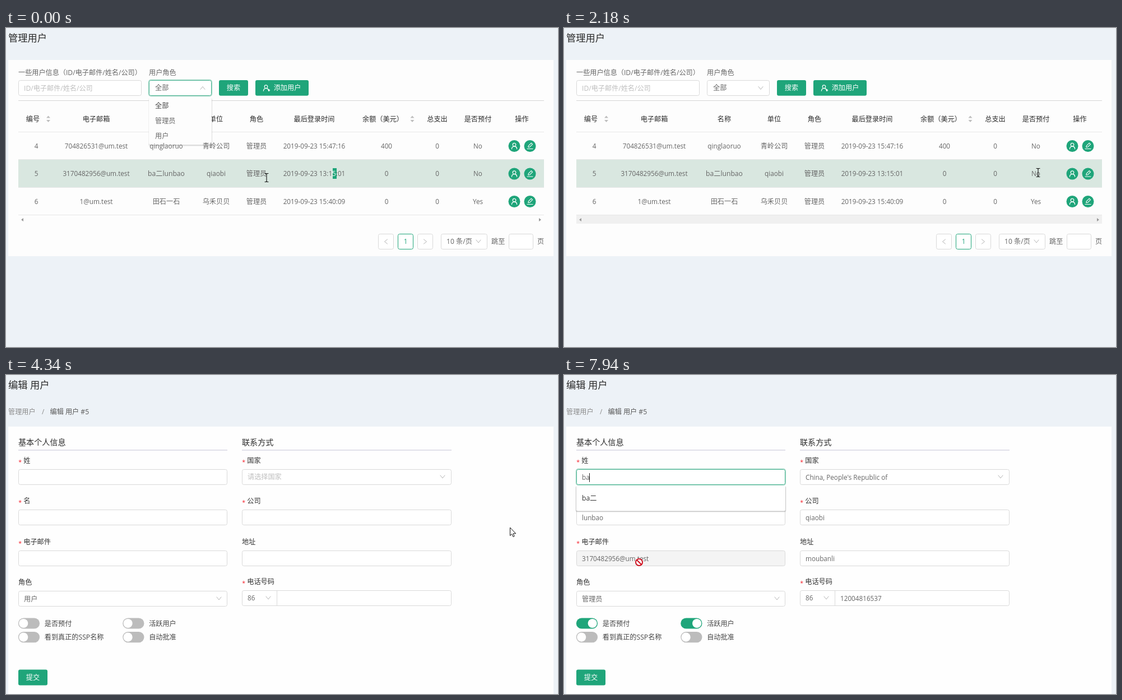
An HTML page that plays this animation: 985x569 px, repeating every 8000 ms.

```html
<!DOCTYPE html>
<html lang="zh-CN">
<head>
<meta charset="utf-8">
<title>管理用户</title>
<style>
html, body { margin: 0; width: 100%; height: 100%; overflow: hidden; background: #edf2f7; }
svg { display: block; font-family: "Open Sans", "Noto Sans CJK SC", "Noto Sans CJK", sans-serif; }
text { white-space: pre; }
</style>
</head>
<body>
<svg id="stage" width="985" height="569" viewBox="0 0 985 569"></svg>
<script>
const stage = document.getElementById('stage');
const LOOP = 8000, GREEN = '#1fa57a', DARK = '#2b2b2b', GREY = '#666', LINE = '#d9d9d9';

const person = { name: 'ba二', given: 'lunbao', email: '3170482956@um.test', firm: 'qiaobi' };
const columns = [54, 161, 286, 375, 447, 550, 679, 769.5, 842];
const rows = [
  [4, '704826531@um.test', 'qinglaoruo', '青岭公司', '管理员', '2019-09-23 15:47:16', 400, 0, 'No'],
  [5, person.email, person.name + person.given, person.firm, '管理员', '2019-09-23 13:15:01', 0, 0, 'No'],
  [6, '1@um.test', '田石一石', '乌禾贝贝', '管理员', '2019-09-23 15:40:09', 0, 0, 'Yes']
];

// time, x, y, pointer shape
const pointerKeys = [
  [0, 465, 267, 'beam'], [140, 560, 312, 'arrow'], [420, 762, 291, 'arrow'], [700, 812, 369, 'arrow'],
  [1130, 877, 260, 'arrow'], [1260, 872, 258, 'arrow'], [1880, 846, 258, 'beam'], [2310, 846, 258, 'beam'],
  [2970, 860, 264, 'arrow'], [3240, 860, 264, 'arrow'], [3250, 900, 297, 'arrow'], [3520, 942, 264, 'hand'],
  [3790, 936, 261, 'hand'], [4220, 936, 261, 'arrow'], [4340, 899, 272, 'arrow'], [4480, 899, 272, 'arrow'],
  [5150, 560, 500, 'arrow'], [5280, 460, 524, 'arrow'], [5690, 47, 442, 'hand'], [5960, 47, 442, 'hand'],
  [6140, 62, 158, 'arrow'], [6270, 123, 205, 'arrow'], [6410, 123, 200, 'beam'], [6690, 123, 185, 'beam'],
  [7930, 123, 185, 'beam'], [7940, 134, 334, 'denied']
];

const isWide = s => /[\u3000-\uffef]/.test(s);

function text(s, x, cy, { fill = GREY, size, anchor = 'start', weight = 400 } = {}) {
  s = String(s);
  size = size || (isWide(s) ? 12.15 : 11.72);
  return `<text x="${x}" y="${cy + size * 0.37}" font-size="${size}" fill="${fill}" text-anchor="${anchor}" font-weight="${weight}">${s}</text>`;
}
const mid = (s, x, cy, fill) => text(s, x, cy, { fill, anchor: 'middle' });
const rect = (x, y, w, h, fill, extra = '') => `<rect x="${x}" y="${y}" width="${w}" height="${h}" fill="${fill}" ${extra}/>`;
const path = (d, stroke, fill = 'none', width = 1) => `<path d="${d}" stroke="${stroke}" fill="${fill}" stroke-width="${width}" stroke-linejoin="round" stroke-linecap="round"/>`;
const at = (x, y, body) => `<g transform="translate(${x} ${y})">${body}</g>`;
const rule = (x, y, w, color) => rect(x, y, w, 1, color);

function box(x, y, w, h = 28, { fill = '#fff', stroke = LINE, focus = false } = {}) {
  const glow = focus ? rect(x - .5, y - .5, w + 1, h + 1, 'none', 'rx="4" stroke="#a9dac9" stroke-width="1.4"') : '';
  return glow + rect(x + .5, y + .5, w - 1, h - 1, fill, `rx="3" stroke="${focus ? '#4cb494' : stroke}"`);
}
const chevron = (x, y, dir = 1) => path(`M${x - 4} ${y - 2.5 * dir}l4 ${5 * dir}l4 ${-5 * dir}`, '#b5b5b5');
const button = (x, y, w, label, cx = x + w / 2) =>
  rect(x, y, w, 27.8, GREEN, 'rx="3"') + text(label, cx, y + 14, { fill: '#fff', anchor: 'middle', weight: 500 });
const userIcon = (x, y) => at(x, y, '<circle cy="-2.3" r="2.8" fill="none" stroke="#fff" stroke-width="1.2"/>' +
  path('M-4.6 5.2c0-6 9.2-6 9.2 0', '#fff', 'none', 1.2));
const pencilIcon = (x, y) => at(x, y, path('M-3.2 2.2l.5-2.6l5-5l2.2 2.2l-5 5zM-5 5h10', '#fff', 'none', 1.1));
const disc = (x, y) => `<circle cx="${x}" cy="${y}" r="10.5" fill="${GREEN}"/>`;
const sorter = x => path(`M${x - 3.5} 160.5l3.5-4l3.5 4zM${x - 3.5} 164l3.5 4l3.5-4z`, 'none', '#bdbdbd');

function pointer(t) {
  let i = pointerKeys.length - 1;
  while (pointerKeys[i][0] > t) i--;
  const [t0, x0, y0, shape] = pointerKeys[i];
  const [t1, x1, y1] = pointerKeys[i + 1] || [LOOP, x0, y0];
  // the pointer moves in visible jumps about 135 ms apart
  const steps = Math.max(1, Math.round((t1 - t0) / 135));
  const k = Math.floor((t - t0) / (t1 - t0) * steps) / steps;
  return { x: Math.round(x0 + (x1 - x0) * k), y: Math.round(y0 + (y1 - y0) * k), shape };
}

const shapes = {
  arrow: path('M.5 .5V14.5L3.7 11.6L6 16.6L8.2 15.6L6 10.8H10.3Z', '#111', '#fff'),
  beam: path('M-3 -7.5H-1L0 -6.5L1 -7.5H3M0 -6.5V6.5M-3 7.5H-1L0 6.5L1 7.5H3', '#111', 'none', 1.1),
  hand: path('M0 1.5C0-.6 2.6-.6 2.6 1.5V7L5.2 7.3L8 8L10 9.2V14L8.6 19.5H1.6L-3.2 12.6C-4 10.4-1.6 9.2 0 11Z', '#111', '#fff'),
  denied: '<circle r="6" fill="#fff" stroke="#cf1322" stroke-width="2"/>' + path('M-4 -4L4 4', '#cf1322', 'none', 2)
};

function listPage(t, cursor) {
  const open = t < 140;
  const hovered = Math.floor((cursor.y - 185.5) / 49.5);
  let s = text('管理用户', 4, 18, { fill: DARK, size: 17.3 }) + rect(4, 57, 973, 350, '#fdfdfd');
  s += text('一些用户信息（ID/电子邮件/姓名/公司）', 22, 80) + text('用户角色', 255, 80);
  s += box(22, 93, 220) + text('ID/电子邮件/姓名/公司', 32, 107.5, { fill: '#bfbfbf' });
  s += box(255, 93, 112, 28, { focus: open }) + text('全部', 266, 107) + chevron(351, 107, open ? -1 : 1);
  s += button(380, 93, 52, '搜索') + button(445, 93, 95, '添加用户', 502);
  s += userIcon(464, 107) + path('M468 111h3M469.5 109.5v3', '#fff');
  s += rule(22, 129, 938, '#d6d6d6');

  const heads = { 编号: 48, 电子邮箱: 161, 名称: 286, 单位: 375, 角色: 447, 最后登录时间: 550,
    '余额（美元）': 672.5, 总支出: 769.5, 是否预付: 842, 操作: 920.5 };
  for (const label in heads) s += mid(label, heads[label], 162.5, DARK);
  s += sorter(75.5) + sorter(725) + rule(22, 185, 938, '#e8e8e8');

  let cells = '';
  rows.forEach((row, r) => {
    const top = 185.5 + r * 49.5, cy = 210.5 + r * 49.5;
    if (r === hovered) s += rect(22, Math.round(top), 938, 49, '#d9e7e0');
    s += rule(22, Math.round(top + 48.5), 938, '#e8e8e8');
    row.forEach((value, c) => {
      let fill = GREY;
      if (r === 1 && c === 5 && open) {
        cells += rect(583, 250, 7, 19, GREEN);
        value = value.replace('15:', '1<tspan fill="#fff">5</tspan>:');
      }
      if (r === 1 && c === 8 && t >= 2310) {
        cells += rect(833.5, 250, 17, 19, GREEN);
        fill = '#fff';
      }
      cells += mid(value, columns[c], cy, fill);
    });
    cells += disc(907, cy) + userIcon(907, cy) + disc(935, cy) + pencilIcon(935, cy);
  });

  if (open) {
    s += rect(255, 125, 113, 85, '#000', 'opacity=".08" rx="3"') + rect(254, 125, 114, 86, '#000', 'opacity=".05" rx="3"');
    s += rect(255, 124, 112, 84, '#fdfdfd', 'rx="3"');
    s += text('全部', 266, 138.5, { fill: '#444', weight: 500 }) + text('管理员', 266, 166) + text('用户', 266, 193);
  }
  s += cells;

  if (!open) s += rect(22, 334, 938, 15, '#f0f0f0');
  s += path('M31 339v6l-4-3zM951 339v6l4-3z', 'none', '#999');
  s += box(664, 367, 28) + path('M680.5 377l-5 4l5 4', '#b5b5b5');
  s += box(699, 367, 28, 28, { stroke: GREEN }) + mid(1, 713, 381, GREEN);
  s += box(734, 367, 28) + path('M745.5 377l5 4l-5 4', '#b5b5b5');
  s += box(776, 367, 83) + text('10 条/页', 786, 381) + chevron(843, 380.5);
  return s + text('跳至', 866, 381) + box(897, 367, 44) + text('页', 948, 381);
}

const LEFT = { x: 22, w: 373 }, RIGHT = { x: 421, w: 374 };

function field({ x, w }, y, label, value, { required = true, select = false, disabled = false, hint = '', focus = false } = {}) {
  let s = required ? text('*', x + .3, y - 13, { fill: '#f5222d', size: 10.5 }) : '';
  s += text(label, x + (required ? 9.3 : 0), y - 15, { fill: '#333' });
  s += box(x, y, w, 28, { fill: disabled ? '#f4f4f4' : '#fff', focus });
  s += value ? text(value, x + 10, y + 14.5) : text(hint, x + 10, y + 14, { fill: '#bfbfbf' });
  return s + (select ? chevron(x + 358, y + 13.5) : '');
}

const toggle = (x, y, on, label) => rect(x, y, 38.3, 19.2, on ? GREEN : '#bcbcbc', 'rx="9.6"') +
  `<circle cx="${x + (on ? 28.9 : 9.4)}" cy="${y + 9.6}" r="8.1" fill="#fff"/>` + text(label, x + 47, y + 9.7, { fill: '#444' });

function editPage(t) {
  const loaded = t >= 5280, focus = t >= 6410, typed = t >= 7670;
  const value = v => loaded ? v : '';
  let s = text('编辑 用户', 4, 18, { fill: DARK, size: 17.3 });
  s += text('管理用户', 4, 66, { fill: '#8a8a8a' }) + text('/', 64, 66, { fill: '#8a8a8a' }) + text('编辑 用户 #5', 78.5, 66, { fill: '#555' });
  s += rect(4, 92, 973, 477, '#fefefe');
  [['基本个人信息', LEFT], ['联系方式', RIGHT]].forEach(([label, { x, w }]) => {
    s += text(label, x, 119.5, { fill: DARK, size: 14.1 }) + rule(x, 133.5, w, '#c6c4d6');
  });

  s += field(LEFT, 168, '姓', value(typed ? person.name.slice(0, 2) : person.name), { focus });
  s += field(LEFT, 240, '名', value(person.given));
  s += field(LEFT, 313, '电子邮件', value(person.email), { disabled: loaded });
  s += field(LEFT, 385, '角色', loaded ? '管理员' : '用户', { required: false, select: true });
  s += field(RIGHT, 168, '国家', value("China, People's Republic of"), { select: true, hint: '请选择国家' });
  s += field(RIGHT, 240, '公司', value(person.firm));
  s += field(RIGHT, 313, '地址', value('moubanli'), { required: false });
  s += field(RIGHT, 384, '电话号码', '') + rect(483, 384, 1, 28, LINE);
  s += text(86, 431, 398) + chevron(468, 397.5) + text(value('12004816537'), 493, 398.5);

  s += toggle(21.8, 433.4, t >= 5830, '是否预付') + toggle(208.2, 433.4, loaded, '活跃用户');
  s += toggle(21.8, 458, false, '看到真正的SSP名称') + toggle(208.2, 458, false, '自动批准');
  s += button(22, 525.6, 52, '提交');

  if (typed) {
    s += rect(21, 198, 375, 46, '#000', 'opacity=".16" rx="3"') + rect(20.5, 198, 376, 47, '#000', 'opacity=".06" rx="3"');
    s += rect(22, 197, 373, 45.5, '#fff', 'rx="2"') + text(person.name, 32, 219.5, { fill: '#333' });
  }
  if (typed || focus && t < 7080) s += rect(typed ? 45 : 57, 175, 1, 16, '#222');
  return s;
}

let last = '';
function draw(now) {
  const t = now % LOOP, cursor = pointer(t);
  const markup = (t < 4220 ? listPage(t, cursor) : editPage(t)) + at(cursor.x, cursor.y, shapes[cursor.shape]);
  if (markup !== last) stage.innerHTML = last = markup;
  requestAnimationFrame(draw);
}
draw(performance.now());
</script>
</body>
</html>
```
